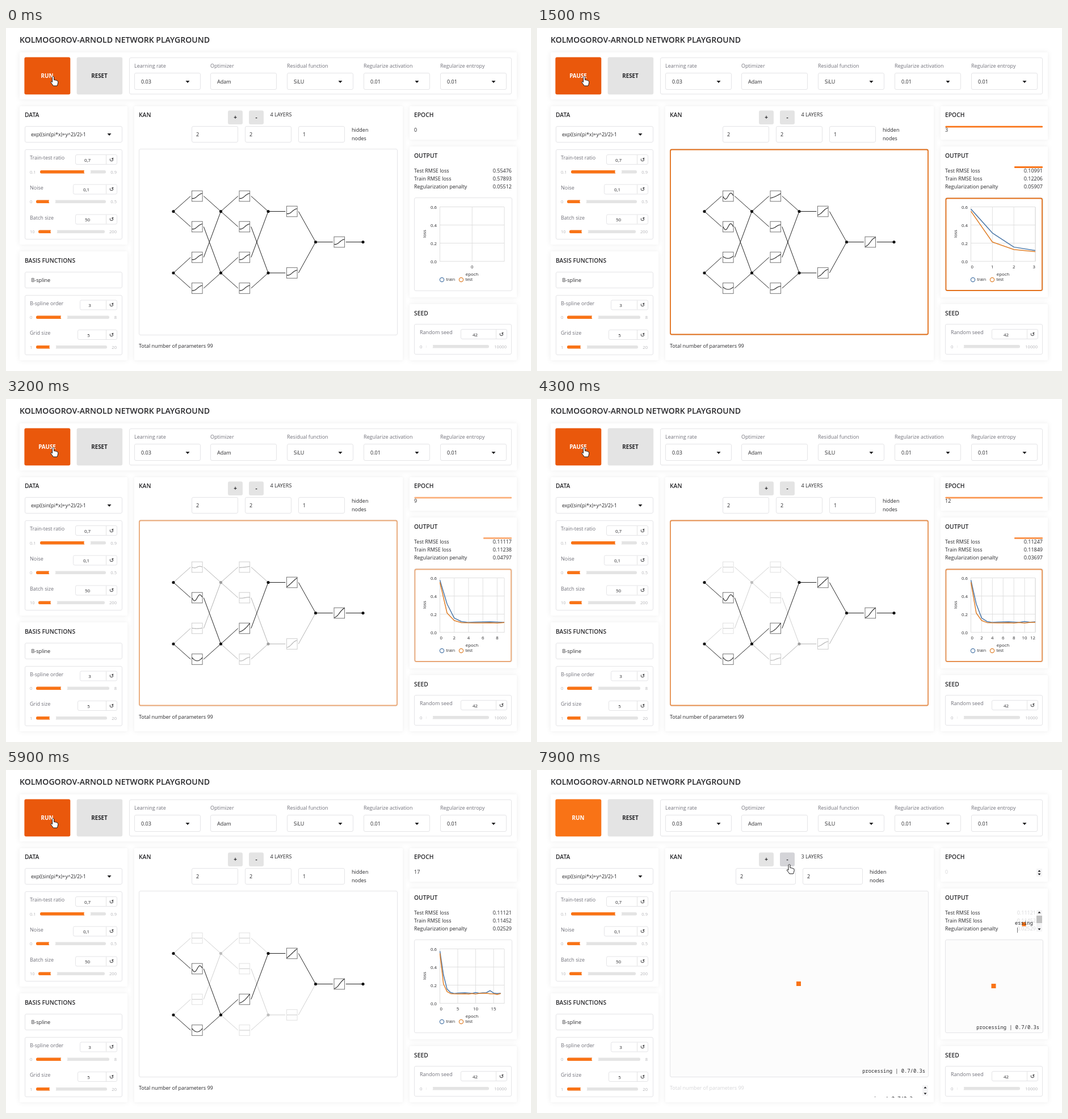
Recreate the animation shown at these times as an HTML page. Size 925 px wide and 605 px high, loop 8 s.

```html
<!DOCTYPE html>
<html lang="en">
<head>
<meta charset="utf-8">
<title>Network playground</title>
<style>
  html, body { margin: 0; width: 100%; height: 100%; overflow: hidden; background: #fff; }
  svg { display: block; }
  text { font: 9px "Open Sans", "Noto Sans", sans-serif; fill: #27272a; white-space: pre; }
  .title { font-size: 14.05px; font-weight: 600; }
  .head { font-size: 10.3px; font-weight: 600; }
  .btn { font-size: 9.8px; font-weight: 700; text-anchor: middle; }
  .label { fill: #71717a; }
  .range { font-size: 7.6px; fill: #b4b4b8; }
  .num { font-size: 8px; text-anchor: middle; }
  .icon { font: 10px "DejaVu Sans", sans-serif; text-anchor: middle; }
  .tick { font-size: 7.8px; }
  .small { font-size: 7.2px; }
  .mid { text-anchor: middle; }
  .end { text-anchor: end; }
  .faint { fill: #d6d6d8; }
  .mono { font: 500 8.8px "Noto Sans Mono", "DejaVu Sans Mono", monospace; }
  .panel { fill: #fff; filter: drop-shadow(0 0 4px rgba(0, 0, 0, .07)); }
</style>
</head>
<body>
<svg width="925" height="605" viewBox="0 0 925 605">
  <clipPath id="plot"><path d="M764 315H880V413H764Z"/></clipPath>
  <clipPath id="foot"><path d="M226 545H678V578H226Z"/></clipPath>
  <g id="page"></g>
  <g id="live"></g>
</svg>
<script>
const ORANGE = '#f97316', HOVER = '#ea580c', GREY = '#e4e4e4', LOOP = 8000;
const $ = id => document.getElementById(id);
const lerp = (a, b, k) => a + (b - a) * Math.max(0, Math.min(1, k));

// Drawing helpers, each returns SVG markup
const text = (x, y, s, cls = '', more = '') => `<text x="${x}" y="${y}" class="${cls}" ${more}>${s}</text>`;
const rect = (x, y, x2, y2, fill, r = 0, more = '') =>
  `<rect x="${x}" y="${y}" width="${x2 - x}" height="${y2 - y}" rx="${r}" fill="${fill}" ${more}/>`;
const box = (x, y, x2, y2, fill = '#fff') => rect(x + .5, y + .5, x2 - .5, y2 - .5, fill, 2.5, 'stroke="#e4e4e7"');
const path = (d, stroke, w = 1, more = '') => `<path d="${d}" fill="none" stroke="${stroke}" stroke-width="${w}" ${more}/>`;
const dot = (x, y, r, fill, more = '') => `<circle cx="${x}" cy="${y}" r="${r}" fill="${fill}" ${more}/>`;
const caret = (x, y, w = 3.5, h = 4) => `<path d="M${x - w} ${y - h / 2}h${2 * w}l${-w} ${h}z" fill="#18181b"/>`;
const panel = (x, y, x2, y2) => rect(x, y, x2, y2, '#fff', 2, 'class="panel"');

function slider(x, y, name, value, [left, right], [lo, hi], [from, to], knob) {
  const line = y + 21.5;
  return text(x, y, name, 'label') + box(left, y - 9, right, y + 9) +
    path(`M${right - 19.5} ${y - 8}v16`, GREY) +
    text((left + right - 19) / 2 - 6, y + 3.5, value, 'num') + text(right - 10, y + 3.5, '↺', 'icon') +
    text(x, line + 3, lo, 'range') + text(right - 1, line + 3, hi, 'range end') +
    rect(from, line - 2.5, to, line + 3, GREY, 2.5) +
    (knob - from > 8 ? rect(from, line - 2.5, knob, line + 3, ORANGE, 2.5) : '') +
    dot(knob - .6, line, 6, '#fff');
}

function drawPage() {
  let s = text(24, 26, 'KOLMOGOROV-ARNOLD NETWORK PLAYGROUND', 'title') +
    panel(24, 43, 900, 126) + panel(24, 138, 214, 382) + panel(24, 394, 214, 586) +
    panel(226, 138, 699, 586) + panel(711, 138, 900, 197) + panel(711, 209, 900, 475) + panel(711, 487, 900, 586) +
    rect(124.6, 51.6, 205.2, 117.2, GREY, 3) + text(164.5, 88, 'RESET', 'btn') + box(217, 52, 891, 117);
  [['Learning rate', '0.03', 1], ['Optimizer', 'Adam', 0], ['Residual function', 'SiLU', 1],
   ['Regularize activation', '0.01', 1], ['Regularize entropy', '0.01', 1]].forEach(([name, value, list], i) => {
    const x = Math.round(225.6 + i * 134.8);
    s += text(x, 70, name, 'label') + box(x, 79, x + 117, 109) + text(x + 12, 97.5, value) +
      (list ? caret(x + 94, 95) : '');
  });
  for (const [x, y, name] of [[33, 157, 'DATA'], [33, 414, 'BASIS FUNCTIONS'], [234, 157, 'KAN'],
    [719, 157, 'EPOCH'], [719, 229, 'OUTPUT'], [719, 507, 'SEED']]) s += text(x, y, name, 'head');
  s += box(33, 173, 205, 202) + text(44, 191, 'exp((sin(pi*x)+y^2)/2)-1') + caret(182, 188) +
    box(33, 214, 205, 373) +
    slider(42, 232, 'Train-test ratio', '0,7', [122, 196], ['0.1', '0.9'], [60, 176], 144) +
    slider(42, 284.5, 'Noise', '0,1', [118, 196], ['0', '0.5'], [53, 176], 82) +
    slider(42, 337.5, 'Batch size', '50', [122, 196], ['10', '200'], [57, 174], 85) +
    box(33, 430, 205, 459) + text(44.5, 447.5, 'B-spline') + box(33, 471, 205, 577) +
    slider(42, 488.5, 'B-spline order', '3', [130, 196], ['0', '8'], [53, 182], 103) +
    slider(42, 541, 'Grid size', '5', [126, 196], ['1', '20'], [53, 178], 83) +
    box(719, 522, 891, 576) +
    slider(729, 540, 'Random seed', '42', [801, 883], ['0', '10000'], [740, 851], 747) +
    text(719, 254.5, 'Test RMSE loss') + text(719, 269, 'Train RMSE loss') + text(719, 283, 'Regularization penalty') +
    rect(391, 145.6, 417, 170, GREY, 3) + text(404, 161, '+', 'btn');
  return s;
}

// Training history by epoch
const train = [.57893, .31542, .16018, .12206, .11173, .11526, .11714, .11802, .11633, .11238, .12164, .11352, .11849,
  .12087, .14236, .11571, .11169, .11452];
const test = [.55476, .21537, .13246, .10991, .10714, .10682, .10597, .10733, .10518, .11117, .10539, .11286, .11247,
  .11462, .10853, .10712, .10037, .11121];
const penaltyKeys = [[0, .05512], [3, .05907], [9, .04797], [12, .03697], [16, .02913], [17, .02529]];
function penalty(e) {
  const i = Math.max(1, penaltyKeys.findIndex(k => k[0] >= e));
  const [a, u] = penaltyKeys[i - 1], [b, v] = penaltyKeys[i];
  return lerp(u, v, (e - a) / (b - a));
}

// The time axis covers span epochs, of which e are finished
function chart(e, span) {
  const px = i => 764.5 + 113.5 * (span ? i / span : .5), py = v => 412 - v * 160;
  const step = span < 8 ? 1 : span < 16 ? 2 : 5;
  let s = '', grid = 'M764.5 316V412M878 316V412';
  for (let i = 0; i < 4; i++) {
    grid += `M764 ${411.5 - i * 32}H878`;
    s += text(759, 414.5 - i * 32, (i * .2).toFixed(1), 'tick end');
  }
  for (let i = 0; i <= span; i += step) {
    grid += `M${px(i)} 316V412`;
    const flush = !span ? 'mid' : i === span ? 'end' : i ? 'mid' : '';
    s += text(px(i), 423.5, i, 'tick ' + flush);
  }
  const curve = (data, color) => e ? path('M' + data.slice(0, e + 1).map((v, i) => `${px(i)} ${py(v)}`).join('L'),
    color, 1.5, 'clip-path="url(#plot)" stroke-linejoin="round"') : '';
  const key = (x, color, name) => dot(x, 444, 3.6, 'none', `stroke="${color}" stroke-width="1.2"`) + text(x + 7.5, 446, name, 'small');
  return path(grid, '#ddd', .9) + s + curve(train, '#4c78a8') + curve(test, '#e0812c') +
    text(821, 437, 'epoch', 'tick mid') + text(0, 0, 'loss', 'tick mid', 'transform="translate(740 363) rotate(-90)"') +
    key(768, '#4c78a8', 'train') + key(802, '#e0812c', 'test');
}

// Each edge: from node, box, to node, then weights of x, sin(pi x), x^2 after warm-up and at the end
const UP = 323.5, LOW = 432, MID = 377.5;
const rows = [296.5, 350.5, 404.5, 459];
const edges = [
  [295, UP, rows[0], UP, [.1, .55, 0]], [295, UP, rows[1], LOW, [0, .6, 0], [.1, .55, .05]],
  [295, LOW, rows[2], UP, [.05, 0, .4]], [295, LOW, rows[3], LOW, [0, 0, .45], [0, 0, .65]],
  [378.5, UP, rows[0], UP, [.45, 0, .1]], [378.5, UP, rows[1], LOW, [.35, .1, .1]],
  [378.5, LOW, rows[2], UP, [.5, .05, .15], [.88, 0, .3]], [378.5, LOW, rows[3], LOW, [.35, .1, .1]],
  [462, UP, UP, MID, [.72, .1, 0], [.9, .02, 0]], [462, LOW, LOW, MID, [.7, .12, 0]],
  [545.5, MID, MID, MID, [.9, .15, 0], [.95, .12, .1]]
];

function network(e) {
  let faded = '', solid = '';
  const alpha = lerp(1, .35, (e - 4) / 4) - lerp(0, .14, (e - 9) / 3);
  const slowAlpha = lerp(1, .35, (e - 4) / 4) - lerp(0, .14, (e - 13) / 3);
  edges.forEach(([x, y, by, ty, warm, last], i) => {
    const cx = x + 41.8, tx = x + 83.5, late = i === 9 || i === 7;
    const decay = late ? 1 - lerp(0, 1, (e - 10) / 6) : 1 - lerp(0, 1, (e - 3) / 8);
    const w = [.5, .12, .1].map((v, j) => e < 3 ? lerp(v, warm[j], e / 3)
      : last ? lerp(warm[j], last[j], (e - 3) / 7) : warm[j] * decay);
    let d = '';
    for (let u = -1; u <= 1.01; u += .125) {
      const v = w[0] * u + w[1] * Math.sin(Math.PI * u) + w[2] * (u * u - .5);
      d += `${d ? 'L' : 'M'}${(cx + u * 9).toFixed(2)} ${(by - v * 9).toFixed(2)}`;
    }
    const part = path(`M${x} ${y}L${cx - 11.5} ${by}M${cx + 11.5} ${by}L${tx} ${ty}`, '#222', 1) +
      rect(cx - 9.3, by - 9.3, cx + 9.3, by + 9.3, '#fff', 0, 'stroke="#666" stroke-width=".9"') +
      path(d, '#222', 1.1);
    if (last) solid += part;
    else faded += `<g opacity="${late ? slowAlpha : alpha}">${part}</g>`;
  });
  for (const [x, y, weak] of [[295, UP], [295, LOW], [378.5, UP, alpha], [378.5, LOW], [462, UP],
    [462, LOW, slowAlpha], [545.5, MID], [629, MID]]) {
    const c = Math.round(235 - 220 * (weak || 1));
    const node = dot(x, y, 2.6, `rgb(${c},${c},${c})`);
    if (weak) faded += node; else solid += node;
  }
  return faded + solid;
}

const hand = (x, y) => `<path transform="translate(${x} ${y})" fill="#fff" stroke="#18181b" stroke-linejoin="round"
  d="M-1.5 1.5C-1.5-.5 1.5-.5 1.5 1.5V6L3.8 6.3 6.3 7Q8.8 7.6 8.8 10L8 14 7 16.5H.3L-1.5 13.8-4.4 10Q-4 8-1.5 10Z"/>`;
const spinner = (x, y, gap) => rect(x - 5, y - gap - 4, x + 5, y + gap + 4, '#f4f4f5') +
  caret(x, y - gap, 2.5, -3) + caret(x, y + gap, 2.5, 3);
const loader = (x, y, r = 4) => rect(x - r, y - r, x + r, y + r, ORANGE);

function drawLive(t) {
  const epoch = Math.max(0, Math.min(17, Math.floor((t - 500) * .0034)));
  const running = t >= 600 && t < 5700, busy = t >= 600 && t < 5800, pending = t >= 7400;
  const move = lerp(0, 1, (t - 5900) / 700), ease = move * move * (3 - 2 * move);
  const cx = lerp(83, 444.5, ease), cy = lerp(85.5, 166.5, ease);

  let s = rect(32.4, 51.6, 113.3, 117.2, cx < 113 ? HOVER : ORANGE, 3) +
    text(72.5, 88, running ? 'PAUSE' : 'RUN', 'btn', 'style="fill:#fff"') +
    rect(428, 145.6, 454, 170, cx > 428 ? '#d4d4d8' : GREY, 3) + text(441, 161, '-', 'btn') +
    text(465.5, 156, (pending ? 3 : 4) + ' LAYERS');
  const [x0, gap, width, values] = pending ? [350, 118, 106, [2, 2]] : [327, 94, 82, [2, 2, 1]];
  values.forEach((v, i) => s += box(x0 + i * gap, 173, x0 + i * gap + width, 202) + text(x0 + i * gap + 8, 191, v));
  const labelX = x0 + values.length * gap;
  s += text(labelX, 183, 'hidden') + text(labelX, 198, 'nodes');

  const fill = pending ? '#fcfcfc' : '#fff', faint = pending ? 'faint' : '';
  s += box(234, 213, 690, 542, fill) + box(719, 299, 892, 464, fill) +
    text(234, 563.5, 'Total number of parameters 99', faint) + text(719, 183, pending ? 0 : epoch, faint);
  [test[epoch], train[epoch], penalty(epoch)].forEach((v, i) =>
    s += text(pending ? 879 : 891, 254.5 + i * 14.3, v.toFixed(5), 'end ' + faint));

  if (pending) {
    const note = `processing | ${((t - 7200) / 1000).toFixed(1)}/0.3s`;
    s += loader(461, 377) + loader(804.5, 381) + loader(858, 272, 3.5) +
      text(684, 533.5, note, 'mono end') + text(885, 456.5, note, 'mono end') +
      `<g clip-path="url(#foot)">${text(667, 583, note, 'mono end')}</g>` +
      text(842, 272.5, 'essing', 'mono') + text(844, 285, '|', 'mono') +
      spinner(684, 565.5, 5.5) + spinner(885, 181, 3) + spinner(885, 266, 15) + rect(880, 257, 890, 270, '#c1c1c1');
  } else s += network(epoch) + chart(epoch, epoch && !busy ? epoch + 1 : epoch);

  if (busy) {
    const glow = .78 + .22 * Math.cos((t - 1450) / 3900 * 2 * Math.PI);
    const frame = 'stroke="#e3701a" stroke-width="1.8"';
    s += `<g opacity="${glow}">` + rect(235, 214.5, 689, 540.5, 'none', 2.5, frame) +
      rect(720.5, 300.5, 890, 463, 'none', 2.5, frame) +
      rect(719.5, 172.7, 891, 175.5, ORANGE, 1) + rect(841, 244, 891, 247, ORANGE, 1) + '</g>';
  }
  return s + hand(cx, cy);
}

$('page').innerHTML = drawPage();
let shown = -1;
const start = performance.now();
function tick(now) {
  // The picture advances ten times a second
  const t = Math.floor(Math.max(0, now - start) % LOOP / 100) * 100;
  if (t !== shown) $('live').innerHTML = drawLive(shown = t);
  requestAnimationFrame(tick);
}
tick(start);
</script>
</body>
</html>
```
